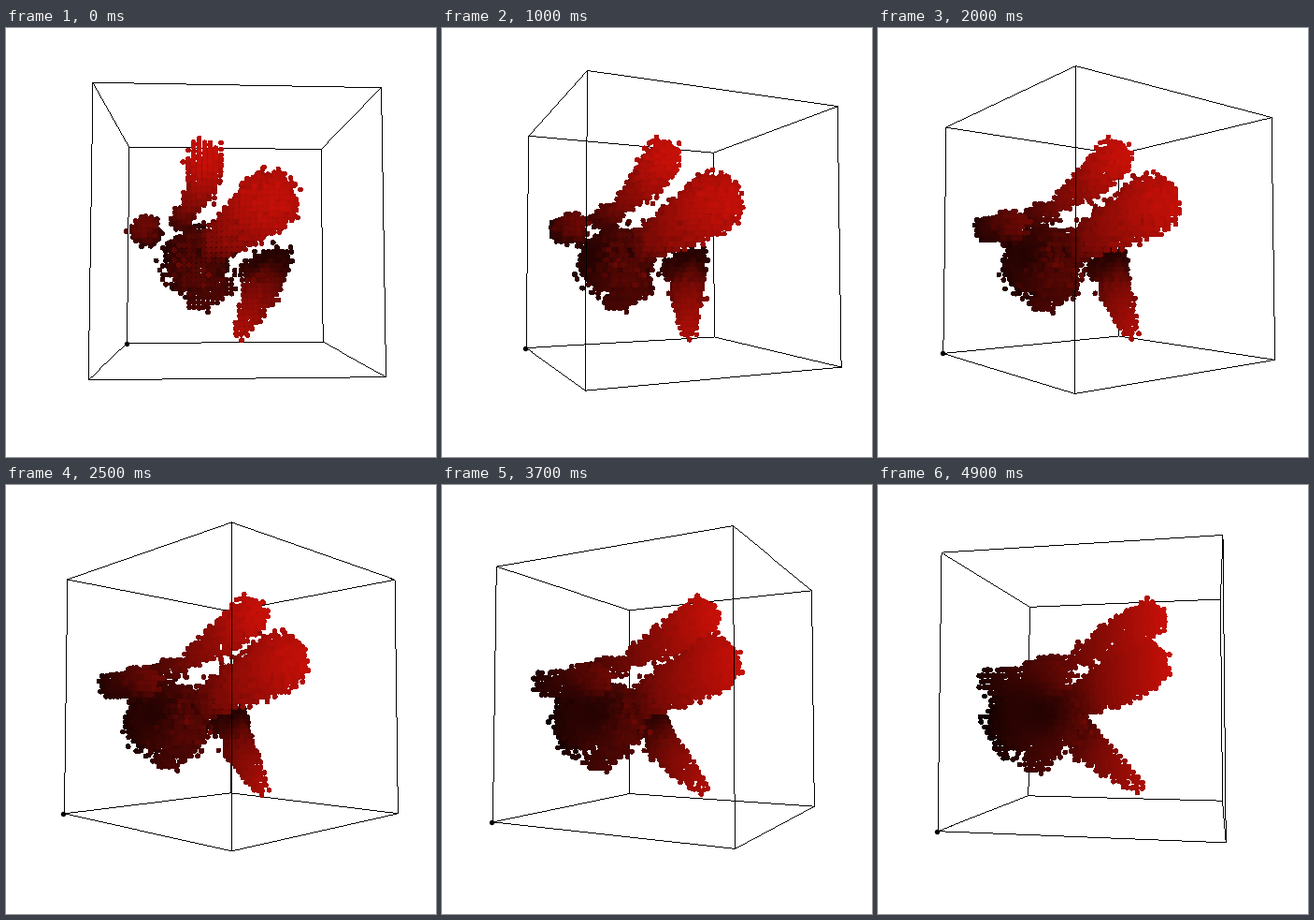
These frames come from a looping animation (460 by 458 pixels, 5000 ms). A matplotlib script:

```python
import numpy as np
import matplotlib.pyplot as plt
from itertools import combinations, product
from matplotlib.animation import FuncAnimation

W, H, DPI = 460, 458, 64
PX = 72 / DPI                   # one pixel in points
CX, CY, SCALE = 240.0, 224.7, 125.0
DEPTH = 0.2045                  # half cube side / camera distance
PITCH = 0.043                   # voxel spacing

# Each limb is a tapered tube through a few (x, y, z, radius) nodes
LIMBS = dict(
    crest=[(-.22, .42, .60, .15), (-.24, .12, .44, .14),
           (-.36, -.15, .27, .08), (-.44, -.45, .18, .11)],
    head=[(.29, .28, .28, .25), (-.12, -.15, -.05, .15)],
    body=[(-.28, -.38, -.17, .28), (-.28, -.65, -.19, .27)],
    bud=[(-.75, -.22, .09, .13), (-.75, -.70, .08, .10)],
    foot=[(-.30, -.50, -.56, .10), (-.08, -.45, -.43, .12)],
    tail=[(.20, -.35, -.26, .10), (.47, -.42, -.18, .13),
          (.28, -.18, -.44, .15), (.06, .30, -.78, .07)],
)


def tube_distance(p, a, b):
    """Distance to the axis from a to b, in units of the local radius."""
    a, b = np.array(a), np.array(b)
    axis = b[:3] - a[:3]
    t = np.clip((p - a[:3]) @ axis / (axis @ axis), 0, 1)[:, None]
    node = a + t * (b - a)
    return np.linalg.norm(p - node[:, :3], axis=1) / node[:, 3]


def make_cloud():
    rng = np.random.default_rng(4)
    axis = np.arange(-1, 1, PITCH)
    grid = np.stack(np.meshgrid(axis, axis, axis, indexing="ij"), -1).reshape(-1, 3)
    dist = np.min([tube_distance(grid, a, b) for nodes in LIMBS.values()
                   for a, b in zip(nodes, nodes[1:])], axis=0)
    n = len(grid)
    solid = (dist < 1 + 0.08 * rng.standard_normal(n)) & (rng.random(n) < 0.75)
    # Loose voxels get more common towards the dark side
    stray = (dist < 1.4) & (rng.random(n) < 0.03 * (0.6 - grid[:, 1]))
    return grid[solid | stray]


def shade(p):
    """Red grows along y, with a dark band through the middle."""
    _, y, z = p.T
    band = np.exp(-((y + 0.35) ** 2 + (z + 0.15) ** 2) / 0.25 ** 2)
    red = np.clip(0.5 + 0.5 * y, 0.04, 1) * (1 - 0.55 * band)
    return np.outer(red, [1, 0.08, 0.04])


def view(tick):
    """Turn and tilt: hold the opening view, then jump into an even spin."""
    if tick < 3:
        return np.radians([3.1, 3.5])
    return np.radians([18.4 + 1.406 * (tick - 6), 2.7])


def project(p, turn, tilt):
    """Screen x, screen y and nearness of points."""
    x, y, z = np.asarray(p, float).T
    right = x * np.cos(turn) + y * np.sin(turn)
    front = y * np.cos(turn) - x * np.sin(turn)
    near = front * np.cos(tilt) - z * np.sin(tilt)
    up = front * np.sin(tilt) + z * np.cos(tilt)
    s = SCALE / (1 - DEPTH * near)
    return CX + s * right, CY - s * up, near


def pixel_line(a, b):
    """Pixel centres of a crisp one-pixel line."""
    steps = int(np.ceil(np.abs(b - a).max())) + 1
    return np.floor(np.linspace(a, b, steps)) + 0.5


cloud = make_cloud()
colors = shade(cloud)
corners = np.array(list(product((-1, 1), repeat=3)))
edges = [(a, b) for a, b in combinations(range(8), 2)
         if np.sum(corners[a] != corners[b]) == 1]

fig = plt.figure(figsize=(W / DPI, H / DPI), dpi=DPI, facecolor="white")
ax = fig.add_axes([0, 0, 1, 1])
ax.set(xlim=(0, W), ylim=(H, 0))
ax.axis("off")

back, = ax.plot([], [], ",", color="black", zorder=1)
dots = ax.scatter(cloud[:, 0], cloud[:, 1], s=(4.7 * PX) ** 2, c=colors,
                  linewidths=0, antialiased=False, zorder=2)
front, = ax.plot([], [], ",", color="black", zorder=3)
origin, = ax.plot([], [], "o", color="black", ms=5.4 * PX, mew=0, zorder=4)


def draw(tick):
    pose = view(tick)
    x, y, near = project(cloud, *pose)
    order = np.argsort(near)
    dots.set_offsets(np.column_stack([x, y])[order])
    dots.set_facecolors(colors[order])

    x, y, near = project(corners, *pose)
    ends = np.column_stack([x, y])
    for artist, side in ((back, False), (front, True)):
        lines = [pixel_line(ends[a], ends[b]) for a, b in edges
                 if (near[a] + near[b] > 0) == side]
        artist.set_data(*np.concatenate(lines).T)
    origin.set_data([x[0]], [y[0]])
    return back, dots, front, origin


anim = FuncAnimation(fig, draw, frames=50, interval=100, repeat=True,
                     repeat_delay=0, blit=False)
plt.show()
```
